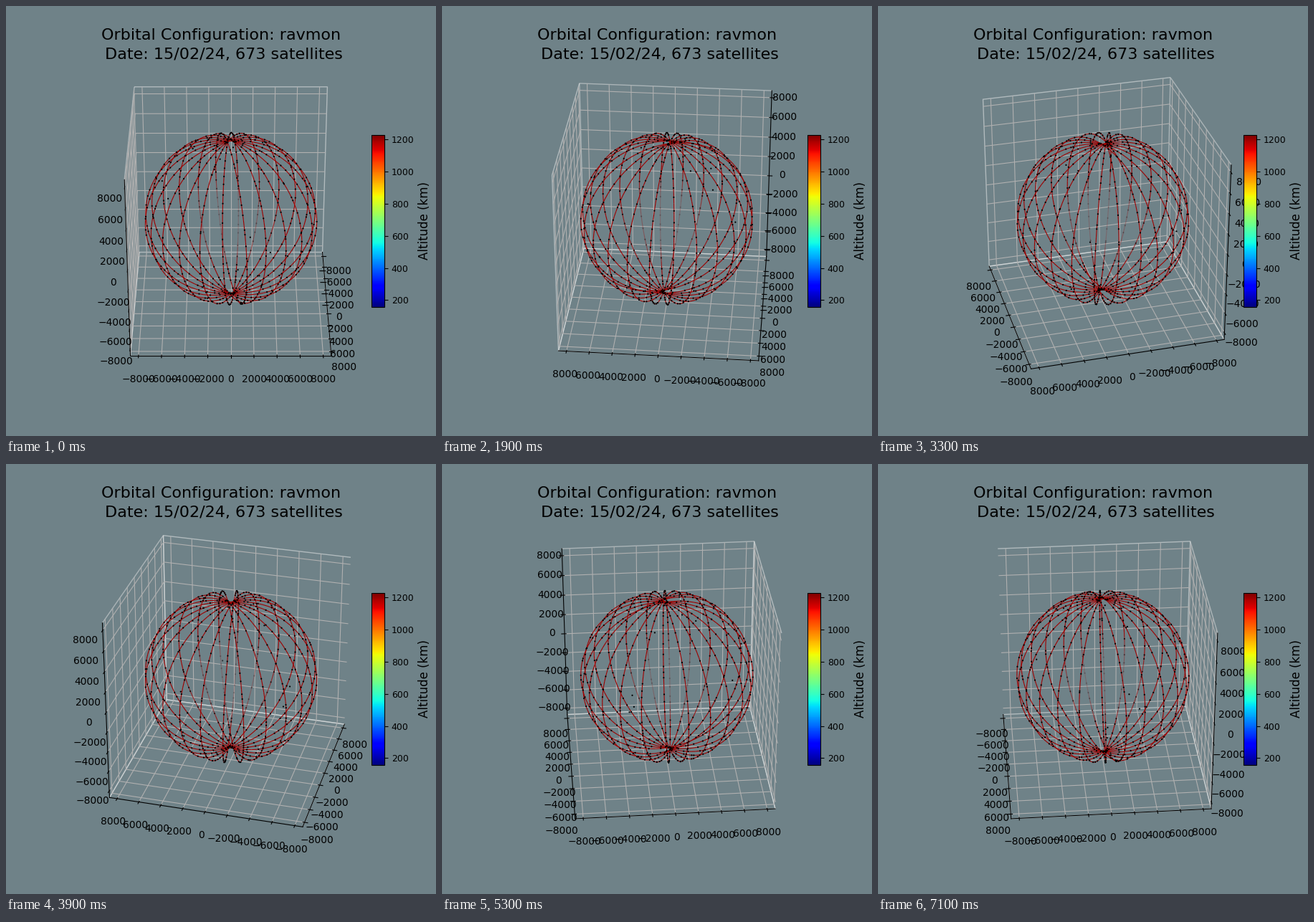
Recreate the animation shown at these times as a matplotlib script. Size 600 by 600 pixels, loop 7.2 s.

```python
import numpy as np
import matplotlib.pyplot as plt
from matplotlib.animation import FuncAnimation
from matplotlib.cm import ScalarMappable
from matplotlib.colors import Normalize
from mpl_toolkits.mplot3d.art3d import Line3DCollection

FRAMES, INTERVAL = 72, 100
BACKGROUND = "#6f8288"
ELEV = 30
EARTH, ALTITUDE = 6378, 1220
RADIUS = EARTH + ALTITUDE
LIMIT = 8700
INCLINATION = np.radians(87.9)
PLANES = np.radians(23.1 + 15.2 * np.arange(12))
PER_PLANE, STRAYS = 55, 13
SEGMENTS = 100

rng = np.random.default_rng(24)


def orbit(node, arg, radius=RADIUS):
    """Points of a circular orbit, shape (n, 3)."""
    x, y = np.cos(arg), np.sin(arg) * np.cos(INCLINATION)
    return np.column_stack([
        radius * (np.cos(node) * x - np.sin(node) * y),
        radius * (np.sin(node) * x + np.cos(node) * y),
        radius * np.sin(INCLINATION) * np.sin(arg),
    ])


def satellites():
    step = 2 * np.pi / PER_PLANE
    groups = []
    for node in PLANES:
        arg = step * (np.arange(PER_PLANE) + rng.uniform(0, 1)
                      + rng.normal(0, 0.25, PER_PLANE))
        groups.append(orbit(node, arg))
    groups.append(orbit(rng.uniform(0, np.pi, STRAYS),
                        rng.uniform(0, 2 * np.pi, STRAYS),
                        EARTH + rng.uniform(300, 1000, STRAYS)))
    return np.vstack(groups)


def shaded(rgb, points, azim):
    """Fade only the points deepest behind the centre of the globe."""
    az, el = np.radians(azim), np.radians(ELEV)
    view = [np.cos(el) * np.cos(az), np.cos(el) * np.sin(az), np.sin(el)]
    depth = points @ view / RADIUS
    alpha = np.clip(1 + 4.7 * (depth + 0.8), 0.2, 1)
    return np.column_stack([np.tile(rgb, (len(points), 1)), alpha])


fig = plt.figure(figsize=(6, 6), dpi=100, facecolor=BACKGROUND)
ax = fig.add_subplot(projection="3d", computed_zorder=False)
ax.set_facecolor(BACKGROUND)

turn = np.linspace(0, 2 * np.pi, SEGMENTS + 1)
paths = np.vstack([np.stack([p[:-1], p[1:]], axis=1)
                   for p in (orbit(node, turn) for node in PLANES)])
middles = paths.mean(axis=1)
tracks = Line3DCollection(paths, linewidths=0.8, zorder=2)
ax.add_collection3d(tracks)

sats = satellites()
dots = ax.scatter(*sats.T, s=2.5, c="black", linewidths=0,
                  depthshade=False, zorder=3)

ticks = np.arange(-8000, 8001, 2000)
ax.set(xlim=(-LIMIT, LIMIT), ylim=(-LIMIT, LIMIT), zlim=(-LIMIT, LIMIT),
       xticks=ticks, yticks=ticks, zticks=ticks)
ax.set_box_aspect((1, 1, 1))
for axis in (ax.xaxis, ax.yaxis, ax.zaxis):
    axis.pane.fill = False

fig.suptitle("Orbital Configuration: ravmon\n"
             f" Date: 15/02/24, {len(sats)} satellites",
             fontsize=16, y=0.948, linespacing=1.45)

bar = fig.colorbar(ScalarMappable(Normalize(157, 1228), "jet"),
                   cax=fig.add_axes([0.85, 0.3, 0.03, 0.4]),
                   ticks=np.arange(200, 1201, 200))
bar.ax.tick_params(labelsize=9)
bar.set_label("Altitude (km)", fontsize=12)


def update(i):
    azim = i * 360 / FRAMES
    ax.view_init(elev=ELEV, azim=azim)
    tracks.set_color(shaded((0.62, 0, 0), middles, azim))
    dots.set_facecolor(shaded((0, 0, 0), sats, azim))
    return tracks, dots


anim = FuncAnimation(fig, update, frames=FRAMES, interval=INTERVAL,
                     repeat=True, repeat_delay=0)
plt.show()
```
